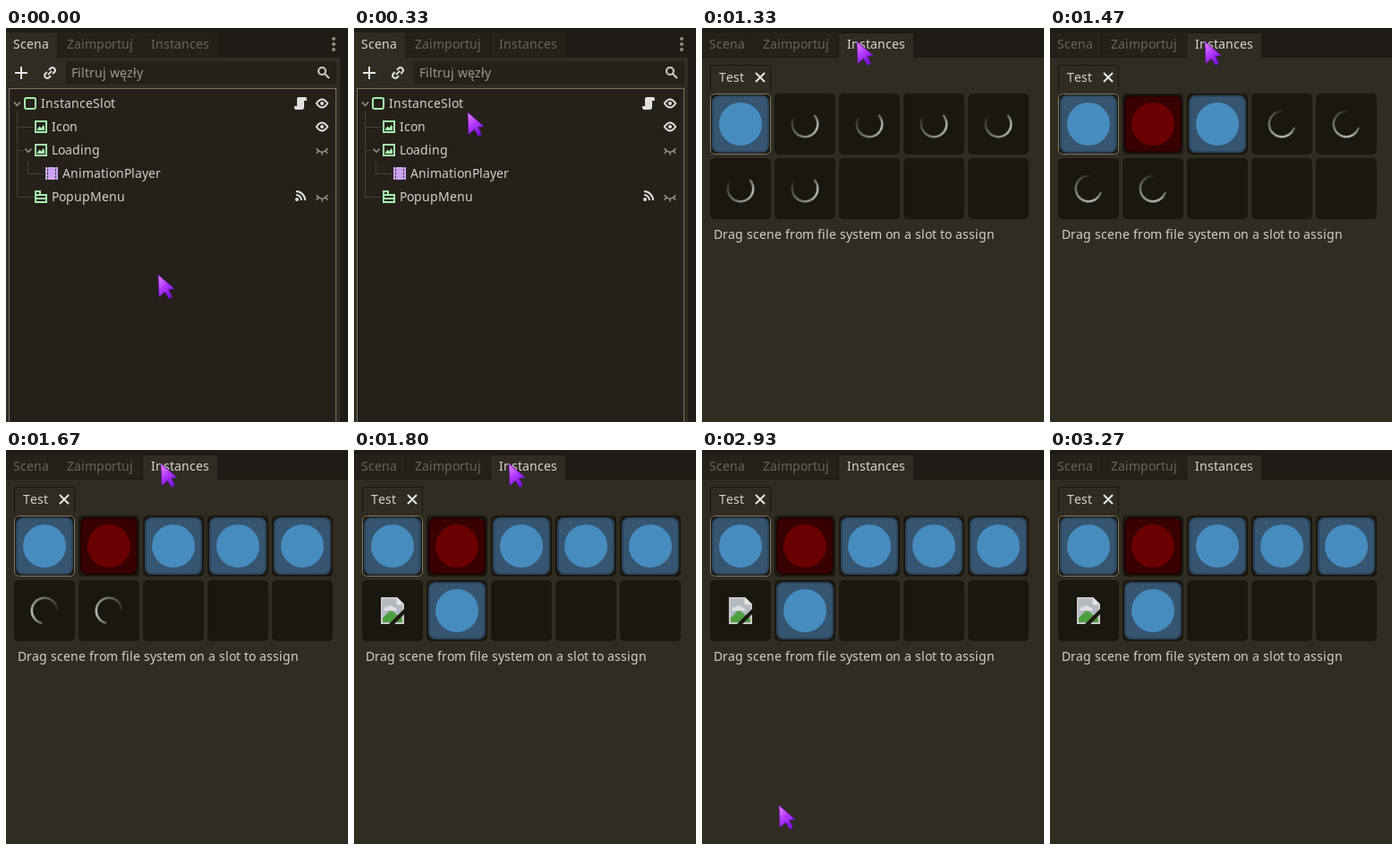
Animation, 382 px wide and 439 px high, one loop 3870 ms. Source, as an HTML page:

```html
<!DOCTYPE html>
<html lang="pl">
<head>
<meta charset="utf-8">
<title>Scene dock</title>
<style>
html, body { margin: 0; width: 100%; height: 100%; overflow: hidden; background: #302c21; }
svg { display: block; width: 382px; height: 439px; }
text { font: 14px "Noto Sans", "Open Sans", sans-serif; font-variant-ligatures: none; white-space: pre; }
</style>
</head>
<body>
<svg id="stage" viewBox="0 0 382 439">
  <defs>
    <linearGradient id="arrow" x1="0" y1="0" x2=".6" y2="1">
      <stop offset="0" stop-color="#e58cff"/>
      <stop offset=".5" stop-color="#b63cff"/>
      <stop offset="1" stop-color="#7a12dc"/>
    </linearGradient>
    <g id="eye" fill="none" stroke="#e0e0e0" stroke-width="2">
      <path d="M-6.2 0Q0-9 6.2 0Q0 9-6.2 0Z"/>
      <circle r="2" fill="#e0e0e0" stroke="none"/>
    </g>
    <g id="lid" fill="none" stroke="#918e87" stroke-width="1.6" stroke-linecap="round">
      <path d="M-6-1.5Q0 6 6-1.5M-4 .8L-5.8 3.2M0 2.5V5M4 .8L5.8 3.2"/>
    </g>
    <g id="image">
      <path d="M-6-6H6V6H-6Z" fill="none" stroke="#a5efac" stroke-width="2"/>
      <path d="M-4 4V2.5L-1.5-.5L.5 1.5L2.5-2L4 0V4Z" fill="#a5efac"/>
    </g>
    <path id="fold" d="M-3.5-1.8L0 1.8L3.5-1.8" fill="none" stroke="#8b877e" stroke-width="1.8"/>
    <g id="ring" fill="none" stroke="#fff" stroke-width="2.6"></g>
    <g id="broken">
      <path d="M-13-15H5L13-7V15H-13Z" fill="#c8c8c8"/>
      <path d="M-11-13H4V-6H11V13H-11Z" fill="#b3bac2"/>
      <path d="M-10 0Q-9-5-5-4Q-2-8 1-4Q5-4 5 0Z" fill="#dedede"/>
      <path d="M-11 13V8L-4 1Q0-1 3 3L11 9V13Z" fill="#4f9e40"/>
      <path d="M5-15V-7H13Z" fill="#e6e6e6"/>
      <path d="M13-2L-4 15H2L13 4Z" fill="#1a1710"/>
    </g>
  </defs>

  <rect width="382" height="439" fill="#302c21"/>
  <rect width="382" height="33" fill="#1f1b17"/>
  <g id="tabs"></g>

  <g id="scene">
    <rect x="373" width="9" height="439" fill="#1f1b17"/>
    <g fill="#928e85"><circle cx="366" cy="12" r="2"/><circle cx="366" cy="18" r="2"/><circle cx="366" cy="24" r="2"/></g>
    <path d="M17 43V57M10 50H24" stroke="#e6e6e6" stroke-width="2"/>
    <g transform="translate(49 50) rotate(-45)" fill="none" stroke="#dcdcdc" stroke-width="2">
      <path d="M-1.5-3H-4A3 3 0 0 0-4 3H-1.5M1.5-3H4A3 3 0 0 1 4 3H1.5M-3 0H3"/>
    </g>
    <rect x="67" y="37" width="302" height="26" rx="2" fill="#25211a"/>
    <g fill="none" stroke="#cfcdc9" stroke-width="2"><circle cx="353" cy="48" r="4"/><path d="M356 51L361 56"/></g>
    <rect x="3.5" y="67.5" width="365" height="380" fill="#25211a" stroke="#77725a"/>
    <path d="M12.5 93V188.5H31M12.5 110.5H31M12.5 136.5H20M24.5 149V162.5H42" fill="none" stroke="#45413a"/>
    <use href="#fold" x="12.5" y="84.5"/>
    <use href="#fold" x="25" y="136.5"/>
    <rect x="21" y="78" width="12" height="12" rx="2" fill="none" stroke="#a5efac" stroke-width="2"/>
    <use href="#image" x="39" y="110"/>
    <use href="#image" x="39" y="136"/>
    <g fill="#cda3f5">
      <rect x="47" y="155" width="8" height="14"/>
      <path d="M44 155h2v14h-2zM56 155h2v14h-2z"/>
      <path d="M44 156.5H58M44 160H58M44 164H58M44 167.5H58" stroke="#cda3f5" stroke-width="1.6"/>
    </g>
    <path d="M33 182H38V186H33ZM33 186H45V194H33ZM33 190H45" fill="none" stroke="#a5efac" stroke-width="2"/>
    <path d="M327 77H334Q336 77 336 80V81H333V88Q333 91 330 91H324Q322 91 322 88V87H325V79Q325 77 327 77Z" fill="#e0e0e0"/>
    <g fill="none" stroke="#e0e0e0" stroke-width="2">
      <circle cx="325" cy="191" r="1" fill="#e0e0e0"/>
      <path d="M324 186A6 6 0 0 1 330 192M324 182A10 10 0 0 1 334 192"/>
    </g>
    <use href="#eye" x="353" y="84"/>
    <use href="#eye" x="353" y="110"/>
    <use href="#lid" x="353" y="136"/>
    <use href="#lid" x="353" y="188"/>
  </g>

  <g id="slots">
    <path d="M0 32.5H152.5V5.5H236.5V32.5H382M9.5 70V41.5H76.5V70" fill="none" stroke="#1a1712"/>
    <path d="M60 50L70 60M70 50L60 60" stroke="#e6e6e6" stroke-width="2"/>
  </g>

  <path id="cursor" d="M0 0L18 15.5L11.5 16.5L15.5 24.5L12 26.5L7.5 19L1 24.5Z"
        fill="url(#arrow)" stroke="#6510b4" stroke-width=".7" stroke-linejoin="round"/>
</svg>

<script>
const LOOP = 3870;
const OPEN = 1330;
const loadTimes = [1330, 1400, 1470, 1600, 1670, 1730, 1800];
const ticks = [0, 70, 130, 200, 270, 330, 400, 530, 600, 670, ...loadTimes,
  2600, 2670, 2730, 2800, 2870, 2930, 3070, 3130, 3200, 3270];

const $ = id => document.getElementById(id);
const pen = document.createElement('canvas').getContext('2d');
pen.font = '14px "Noto Sans", "Open Sans", sans-serif';

function add(parent, tag, attrs) {
  const node = document.createElementNS('http://www.w3.org/2000/svg', tag);
  for (const key in attrs) node.setAttribute(key, attrs[key]);
  return parent.appendChild(node);
}

// Glyphs sit on whole pixels, as in the editor's hinted font.
function label(parent, str, x, y, fill = '#d2d0cb') {
  const xs = [];
  for (const ch of str) {
    xs.push(x);
    x += Math.round(pen.measureText(ch).width);
  }
  const node = add(parent, 'text', { x: xs.join(' '), y, fill });
  node.textContent = str;
  return node;
}

const show = (node, on) => node.setAttribute('display', on ? 'inline' : 'none');

const tabs = [['Scena', 0, 57, 8], ['Zaimportuj', 58, 94, 68], ['Instances', 153, 83, 162]]
  .map(([name, x, width, textX]) => ({
    back: add($('tabs'), 'rect', { x, width, y: 5, height: 28 }),
    text: label($('tabs'), name, textX, 23)
  }));

label($('scene'), 'Filtruj węzły', 73, 55, '#9b978e');
[['InstanceSlot', 39], ['Icon', 51], ['Loading', 51], ['AnimationPlayer', 63], ['PopupMenu', 51]]
  .forEach(([name, x], row) => label($('scene'), name, x, 89 + 26 * row));
label($('slots'), 'Test', 19, 60);
label($('slots'), 'Drag scene from file system on a slot to assign', 13, 235);

// Fading ring, drawn clockwise from its blunt end.
for (let i = 0; i < 40; i++) {
  const k = i / 40;
  const point = a => `${14.2 * Math.cos(a)} ${14.2 * Math.sin(a)}`;
  const a = k * 4.6;
  add($('ring'), 'path', {
    d: `M${point(a)}A14.2 14.2 0 0 1 ${point(a + 0.125)}`,
    opacity: (0.85 * Math.min(1, 0.35 + k * 3) * Math.pow(1 - k, 0.9)).toFixed(2)
  });
}

function drawIcon(parent, i) {
  if (i === 5) return add(parent, 'use', { href: '#broken' });
  const red = i === 1;
  add(parent, 'rect', {
    x: -31, y: -31, width: 62, height: 62, rx: 7, 'stroke-width': 2,
    fill: red ? '#380000' : '#355570', stroke: red ? '#260000' : '#2c455c'
  });
  add(parent, 'circle', { r: 24, fill: red ? '#6a0000' : '#478cbf' });
}

const slots = [];
for (let i = 0; i < 10; i++) {
  const cell = add($('slots'), 'g', { transform: `translate(${43 + 72 * (i % 5)} ${i < 5 ? 107 : 179})` });
  add(cell, 'rect', { x: -34, y: -34, width: 68, height: 68, rx: 5, fill: '#1a1710' });
  if (i > 6) continue;
  const icon = add(cell, 'g', {});
  drawIcon(icon, i);
  if (i === 0) {
    add(cell, 'rect', { x: -33.5, y: -33.5, width: 67, height: 67, rx: 5, fill: 'none', stroke: '#827d68' });
  }
  slots.push({ icon, ring: add(cell, 'use', { href: '#ring' }) });
}

const bezier = (s, a, b, c, d) => {
  const r = 1 - s;
  return r * r * r * a + 3 * r * r * s * b + 3 * r * s * s * c + s * s * s * d;
};
const mix = (a, b, k) => a + (b - a) * k;

function cursorAt(t) {
  if (t <= 530) {
    const u = t / 530, s = u * u * (3 - 2 * u);
    return [bezier(s, 170, 122, 104, 157), bezier(s, 275, 200, 80, 25)];
  }
  if (t < 2600) {
    const k = Math.min(1, (t - 530) / 140);
    return [mix(157, 173, k), mix(25, 15, k)];
  }
  if (t <= 3070) {
    const u = (t - 2600) / 470, s = u * (2 - u);
    return [bezier(s, 148, 43, 68, 93), bezier(s, 36, 110, 330, 424)];
  }
  const k = (t - 3070) / 130;
  return [mix(93, 91, k), mix(424, 436, k)];
}

function render(now) {
  const t = ticks.filter(tick => tick <= now).pop();
  const opened = t >= OPEN;
  const loaded = loadTimes.filter(time => time <= t).length;
  const angle = -45 + (t - OPEN) * 0.43;

  show($('scene'), !opened);
  show($('slots'), opened);
  tabs.forEach(({ back, text }, i) => {
    const active = i === (opened ? 2 : 0);
    back.setAttribute('fill', active ? '#302c21' : '#25211a');
    back.setAttribute('height', active ? 28 : 27);
    text.setAttribute('fill', active ? '#d8d6d1' : '#69655b');
  });
  slots.forEach(({ icon, ring }, i) => {
    show(icon, i < loaded);
    show(ring, i >= loaded);
    ring.setAttribute('transform', `rotate(${angle})`);
  });

  const [x, y] = cursorAt(t);
  show($('cursor'), t < 3270);
  $('cursor').setAttribute('transform', `translate(${Math.round(x)} ${Math.round(y)})`);
}

const start = performance.now();
function loop() {
  render((performance.now() - start) % LOOP);
  requestAnimationFrame(loop);
}
loop();
</script>
</body>
</html>
```
